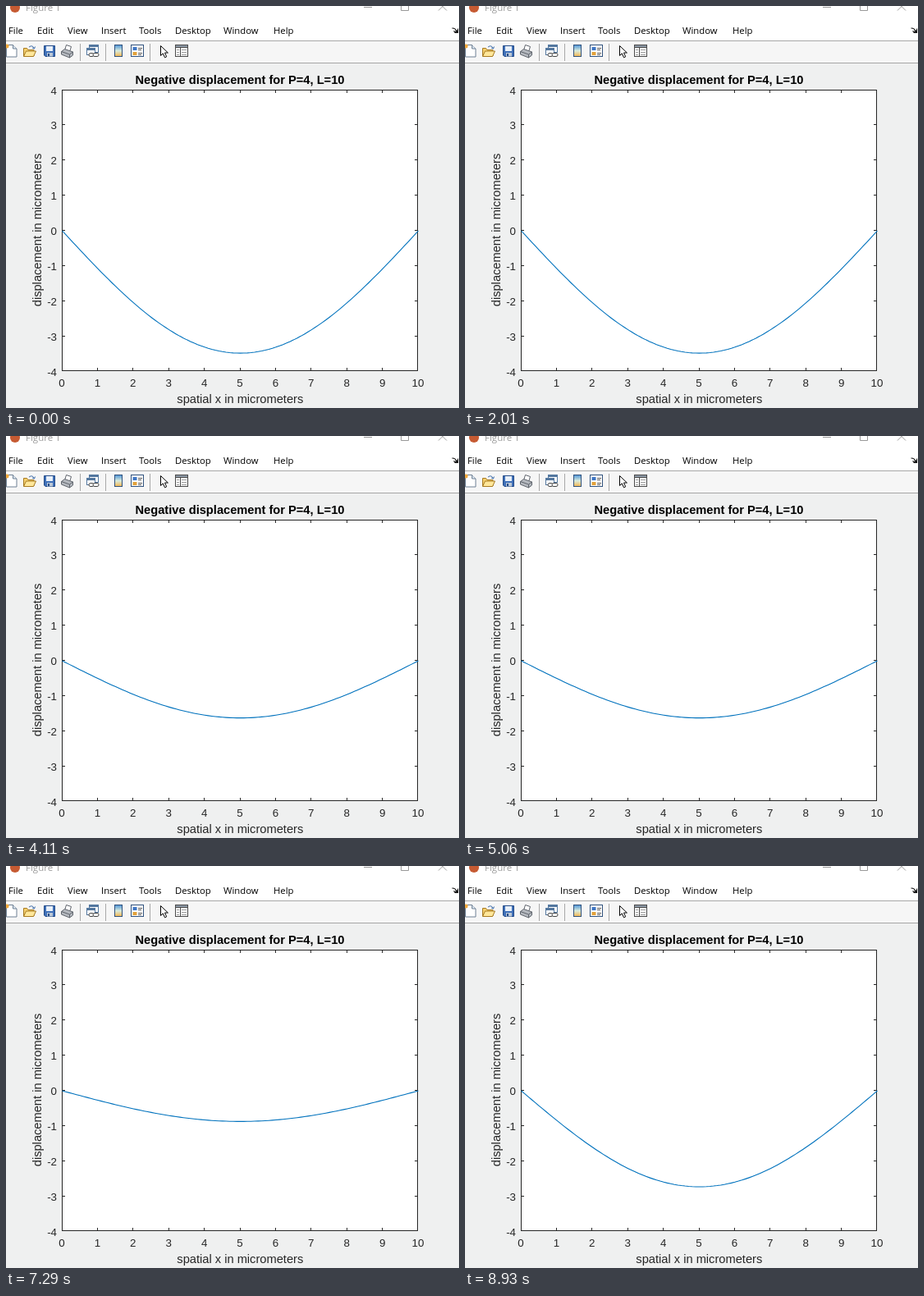
An HTML page that plays this animation: 552x490 px, repeating every 9020 ms.

```html
<!DOCTYPE html>
<html lang="en">
<head>
<meta charset="utf-8">
<title>Displacement plot</title>
<style>
  html, body { margin: 0; width: 100%; height: 100%; overflow: hidden; background: #eff0f0; }
  svg { display: block; }
  .menu { font: 11.3px "Open Sans", "Noto Sans", sans-serif; fill: #000; }
  .plot { font-family: "Liberation Sans", Arial, sans-serif; fill: #262626; }
  .tick { font-size: 13.33px; }
  .label { font-size: 14.67px; text-anchor: middle; }
  .crisp { shape-rendering: crispEdges; }
</style>
</head>
<body>
<svg width="552" height="490" viewBox="0 0 552 490">
  <rect width="552" height="490" fill="#eff0f0"/>
  <rect width="552" height="43" fill="#fff"/>
  <rect y="43" width="552" height="26" fill="#f6f6f6"/>
  <g class="crisp">
    <rect y="42" width="552" height="1" fill="#a8a8a8"/>
    <rect y="69" width="552" height="1" fill="#a5a5a5"/>
  </g>

  <!-- title bar -->
  <circle cx="11" cy="2" r="6" fill="#c65a32"/>
  <text x="24" y="6" font-size="11.5" font-family="Open Sans, Noto Sans, sans-serif" fill="#999">Figure 1</text>
  <g fill="none" stroke="#999">
    <path d="M436 1.5h10M481.5-4v9.500h9v-9.500"/>
    <path d="M527-4.500l10 10M537-4.500l-10 10"/>
  </g>
  <g class="menu" id="menu"></g>
  <path d="M543.500 27q5 0 5 4M545.500 30.500l3 2 2-3.500v3.500h-4" fill="none" stroke="#111" stroke-width="1.200"/>

  <!-- toolbar -->
  <g class="crisp" stroke="#a8a8a8"><path d="M90.500 46v21M121.500 46v21M175.500 46v21"/></g>
  <g transform="translate(0 47)">
    <path d="M.5.500h8l4.500 4.500v10h-12.500z" fill="#fff" stroke="#6f8094"/>
    <path d="M8.500.500v4.500h4.500" fill="#dce6f0" stroke="#6f8094"/>
    <circle cx="1" cy="2" r="2.500" fill="#f0a83c"/>
  </g>
  <g transform="translate(21 47)" stroke="#a77a22">
    <path d="M.5 14v-9.500h4l1.500 2h7v7.500z" fill="#f5d06f"/>
    <path d="M.5 14.500l3-6.500h12l-3 6.500z" fill="#ffe79a"/>
    <path d="M7 3q4-3 6.500 1.500m-2.500-.5l2.500 1 1-2.500" fill="none" stroke="#3d6ca8"/>
  </g>
  <g transform="translate(46 48)">
    <path d="M.5.500h13v13h-11.500l-1.500-1.500z" fill="#3f70b8" stroke="#234a87"/>
    <rect x="3" y="1" width="8" height="6" fill="#e8f0fa"/>
    <rect x="4" y="9" width="7" height="4.500" fill="#bcc8d6"/>
    <rect x="5" y="10" width="2" height="3" fill="#234a87"/>
  </g>
  <g transform="translate(67 47)" stroke="#5f646c">
    <path d="M4.500 7l2-6.500 6 2-2 6.500z" fill="#fff"/>
    <path d="M.5 8.500l4-3 10 3.500v4l-4 3-10-4z" fill="#b4b8be"/>
    <path d="M.5 8.500l10 3.500 4-3M10.500 12v4" fill="none"/>
  </g>
  <g transform="translate(98 47)" fill="#fff" stroke="#53779f">
    <rect x="3.500" y=".5" width="11" height="9"/>
    <path d="M4 2h10" stroke-width="2"/>
    <rect x=".5" y="4.500" width="10" height="8"/>
    <path d="M1 6h9" stroke-width="2"/>
    <rect x="3" y="10.500" width="6" height="4" rx="2" stroke="#444"/>
    <rect x="8" y="10.500" width="7" height="4" rx="2" stroke="#444"/>
  </g>
  <linearGradient id="bar" x2="0" y2="1">
    <stop stop-color="#4d93d8"/><stop offset=".5" stop-color="#d7eadc"/><stop offset="1" stop-color="#f4b64e"/>
  </linearGradient>
  <rect x="132.500" y="47.500" width="9" height="14" fill="url(#bar)" stroke="#31527d"/>
  <g transform="translate(152 47)">
    <rect x=".5" y=".5" width="15" height="14" fill="#fff" stroke="#31527d"/>
    <rect x="2.500" y="3" width="5" height="4" fill="#3f76c4"/>
    <rect x="2.500" y="9" width="5" height="4" fill="#e4a13a"/>
    <path d="M9 4.500h5M9 6.500h4M9 10.500h5M9 12.500h4" stroke="#555"/>
  </g>
  <path d="M188.500 48.500v12l2.800-2.700 2.200 5 2.200-1-2.200-4.800h3.900z" fill="#fff" stroke="#000"/>
  <g transform="translate(206 47)" class="crisp">
    <rect x=".5" y=".5" width="15" height="14" fill="#fff" stroke="#4a4a4a"/>
    <path d="M1 2h14" stroke="#8d99a6" stroke-width="2"/>
    <path d="M1 3.500h14M6.500 4v11" stroke="#4a4a4a"/>
    <path d="M8 6.500h6M8 9.500h6M8 12.500h6M2 6.500h3M2 9.500h3M2 12.500h3" stroke="#999"/>
  </g>

  <!-- plot -->
  <rect x="68" y="102" width="434" height="343" fill="#fff"/>
  <path id="axes" class="crisp" fill="none" stroke="#262626"/>
  <g class="plot">
    <g class="tick" id="ticks"></g>
    <text class="label" x="285" y="95" font-weight="bold" fill="#000">Negative displacement for P=4, L=10</text>
    <text class="label" x="285.300" y="484">spatial x in micrometers</text>
    <text class="label" transform="translate(43 273) rotate(-90)">displacement in micrometers</text>
  </g>
  <path id="curve" fill="none" stroke="#0072bd" stroke-width="1.100" stroke-linejoin="round"/>
</svg>
<script>
const LOOP = 9020;
const LEFT = 68.5, TOP = 102.5, WIDTH = 434, HEIGHT = 343;
const RIGHT = LEFT + WIDTH - 1, BOTTOM = TOP + HEIGHT - 1;
const TICK = 3.5;
const px = x => LEFT + WIDTH * x / 10;
const py = y => TOP + HEIGHT * (4 - y) / 8;
const snap = v => Math.floor(v - 0.5) + 0.5;
const $ = id => document.getElementById(id);

function addText(parent, str, x, y, anchor) {
  const el = document.createElementNS("http://www.w3.org/2000/svg", "text");
  el.setAttribute("x", x);
  el.setAttribute("y", y);
  el.setAttribute("text-anchor", anchor);
  el.textContent = str;
  parent.appendChild(el);
}

const menu = { File: 3, Edit: 38, View: 75, Insert: 116, Tools: 162, Desktop: 206, Window: 265, Help: 326 };
for (const name in menu) addText($("menu"), name, menu[name], 34, "start");

function drawAxes() {
  let d = `M${LEFT} ${TOP}H${RIGHT}V${BOTTOM}H${LEFT}Z`;
  for (let i = 1; i < 10; i++) {
    d += `M${snap(px(i))} ${TOP}v${TICK}m0 ${BOTTOM - TOP - 2 * TICK}v${TICK}`;
  }
  for (let i = -3; i < 4; i++) {
    d += `M${LEFT} ${snap(py(i))}h${TICK}m${RIGHT - LEFT - 2 * TICK} 0h${TICK}`;
  }
  for (let i = 0; i <= 10; i++) addText($("ticks"), i, px(i) - 0.5, 464, "middle");
  for (let i = -4; i <= 4; i++) addText($("ticks"), i, 62, py(i) + 5, "end");
  $("axes").setAttribute("d", d);
}

// Bursts of redraws: first time, last time, number of steps
const bursts = [
  [1140, 1450, 5], [1630, 1860, 4], [2010, 2240, 4], [2390, 2620, 4],
  [2770, 3000, 4], [3150, 3480, 5], [3630, 3720, 2], [3870, 4110, 4],
  [4260, 4830, 8], [4980, 5210, 4], [5360, 5590, 4], [5740, 6210, 7],
  [6360, 6670, 5], [6820, 7140, 5], [7290, 8610, 13], [8780, 8930, 3]
];

function stepAt(t) {
  let n = 0;
  for (const [from, to, count] of bursts) {
    if (t < from) break;
    n += Math.min(count, 1 + Math.floor((t - from) / (to - from) * (count - 1) + 1e-6));
  }
  return n;
}

// One vibration takes ten steps
const depth = n => 1.8 + 1.83 * Math.cos((23.5 + 36 * n) * Math.PI / 180);

let shown = -1;
function draw(t) {
  const n = stepAt(t);
  if (n === shown) return;
  shown = n;
  const a = depth(n);
  let d = "";
  for (let i = 0; i <= 100; i++) {
    const y = -a * Math.sin(Math.PI * i / 100);
    d += (i ? "L" : "M") + px(i / 10).toFixed(2) + " " + py(y).toFixed(2);
  }
  $("curve").setAttribute("d", d);
}

drawAxes();
const start = performance.now();
function tick() {
  draw((performance.now() - start) % LOOP);
  requestAnimationFrame(tick);
}
tick();
</script>
</body>
</html>
```
